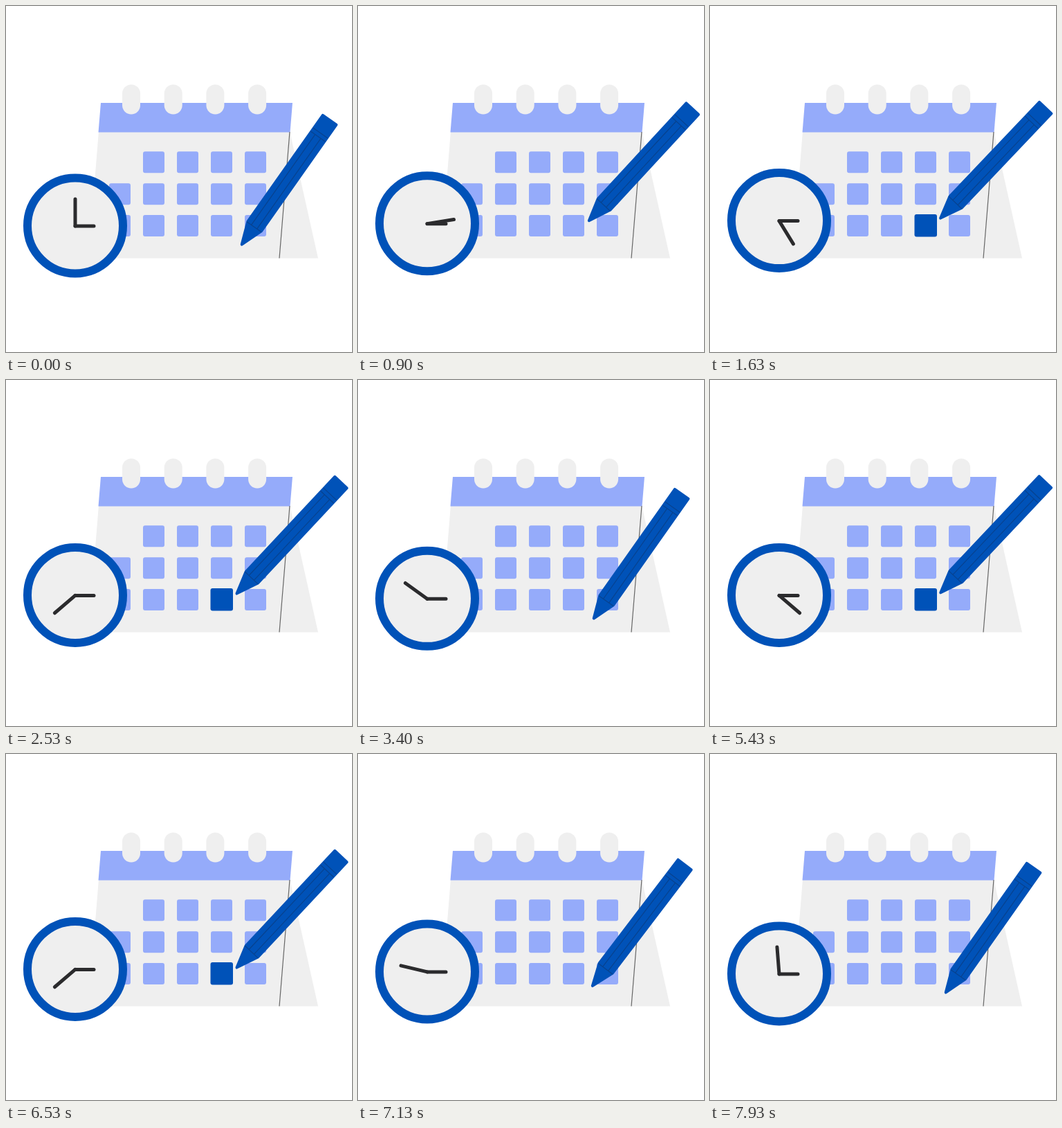
These frames come from a looping animation (500 by 500 pixels, 8.01 s). An HTML page:

```html
<!DOCTYPE html>
<html lang="en">
<head>
<meta charset="utf-8">
<title>Calendar, clock and pencil</title>
<style>
  html, body { margin: 0; height: 100%; overflow: hidden; background: #fff; }
  svg { display: block; width: 100%; height: 100%; }
</style>
</head>
<body>
<svg viewBox="0 0 500 500">
  <g fill="#efefef">
    <path d="M134 181 410 181 451 364.5 119 364.5Z"/>
    <path fill="#95abfa" d="M137 140H414L410.500 182.500H133.500Z"/>
    <g id="rings"></g>
  </g>
  <path d="M410 182 395 364.500" stroke="#666" stroke-width="1.200"/>
  <g id="days" fill="#95abfa"></g>
  <rect id="marked" x="295.500" y="301" width="32.500" height="32.500" rx="3" fill="#0052b8"/>
  <g id="clock">
    <circle r="69" fill="#efefef" stroke="#0052b8" stroke-width="12"/>
    <g stroke="#2b2b2d" stroke-width="5" stroke-linecap="round">
      <path d="M0 .5H27"/>
      <path id="minute" d="M0 .5V-38.500"/>
    </g>
  </g>
  <!-- The pencil lies along x with its tip at the origin. -->
  <g id="pencil" fill="#0052b8" stroke="#0052b8" stroke-linejoin="round">
    <path d="M3 0 35 -12H223V12H35Z" stroke-width="4"/>
    <path d="M34 -13V13M34 -5H194M34 5H194M194 -13V13M200 -13V13"
          fill="none" stroke="#07428f" stroke-width="1.200"/>
  </g>
</svg>
<script>
const LOOP = 8010, CYCLE = 4000;
const el = id => document.getElementById(id);

function addRect(parent, x, y, width, height, rx) {
  const rect = document.createElementNS("http://www.w3.org/2000/svg", "rect");
  const attrs = { x, y, width, height, rx };
  for (const name in attrs) rect.setAttribute(name, attrs[name]);
  parent.append(rect);
}

for (let i = 0; i < 4; i++) addRect(el("rings"), 168 + i * 60.7, 113.5, 26, 43, 13);

for (let row = 0; row < 3; row++)
  for (let col = row ? 0 : 1; col < 5; col++)
    addRect(el("days"), 149 + col * 49, 210.3 + row * 45.9, 31, 31, 3);

function smooth(t, start, end) {
  const u = Math.min(1, Math.max(0, (t - start) / (end - start)));
  return u * u * (3 - 2 * u);
}

// Quick approach, slow drift to the far point, then the same way back.
function reach(t) {
  const mid = 1810, s = mid - Math.abs(t - mid);
  return 0.94 * smooth(s, 200, 1000) + 0.06 * smooth(s, 1000, mid);
}

function draw(ms) {
  // Poses advance in 50 ms steps, shown for 30 and 70 ms in turn.
  const step = Math.min(159, 2 * Math.floor(ms / 100) + (ms % 100 >= 30 ? 1 : 0));
  const t = step * 50 % CYCLE;
  const lift = 4 * (1 - Math.cos(2 * Math.PI * t / CYCLE));
  const p = reach(t);
  el("clock").setAttribute("transform", `translate(100 ${317.5 - lift})`);
  el("minute").setAttribute("transform", `rotate(${step * 4.5} 0 .5)`);
  el("pencil").setAttribute("transform",
    `translate(${339 - 8 * p} ${347 - 38.5 * p}) rotate(${-54.8 + 8.4 * p})`);
  el("marked").style.display = t >= 1000 && t < 2650 ? "" : "none";
}

const start = performance.now();
function tick() {
  draw((performance.now() - start) % LOOP);
  requestAnimationFrame(tick);
}
tick();
</script>
</body>
</html>
```
